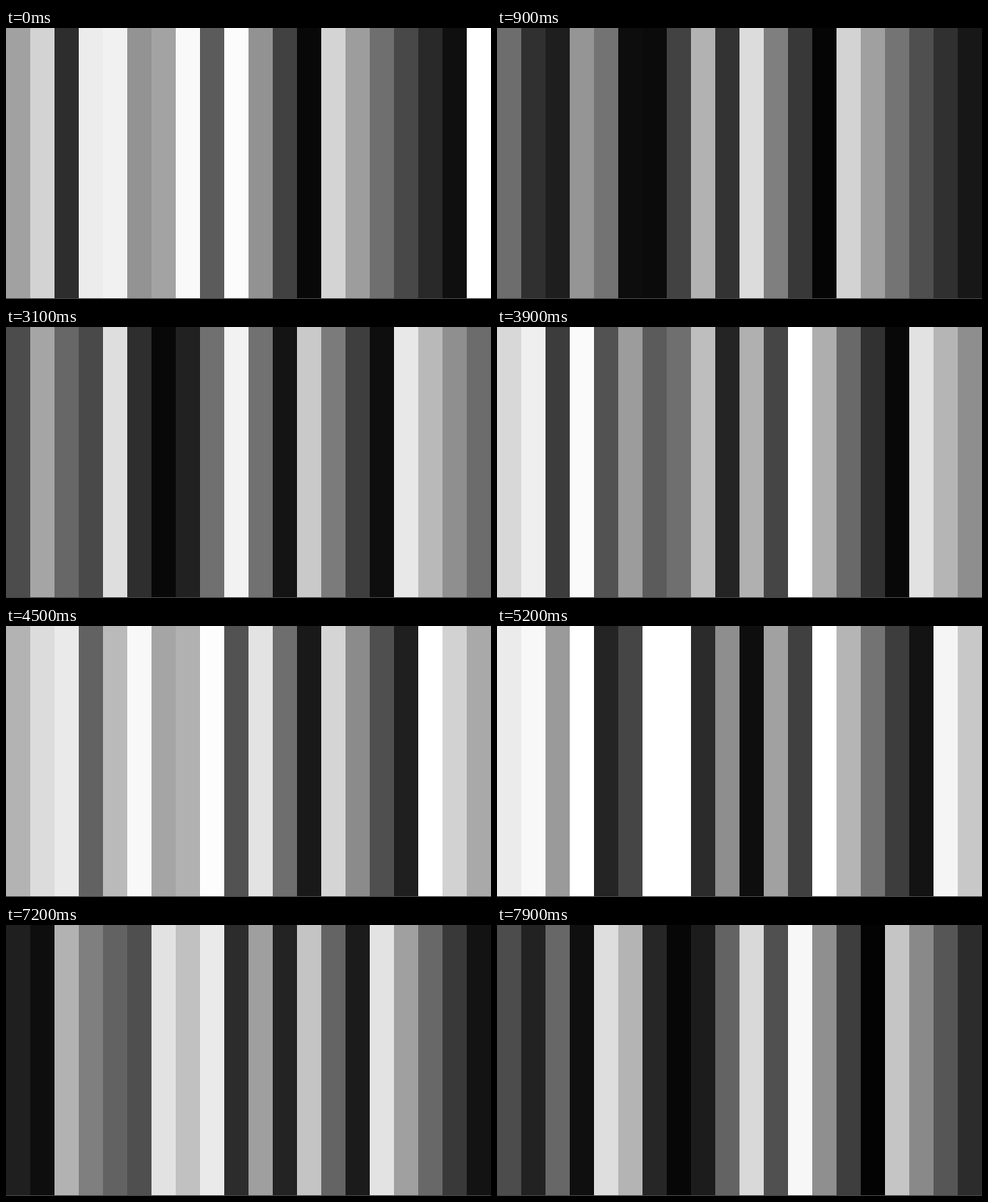
These frames come from a looping animation (600 px wide and 336 px high, 8 s). An HTML page with a canvas:

```html
<!DOCTYPE html>
<html lang="en">
<head>
<meta charset="utf-8">
<title>Harmonic bars</title>
<style>
  html, body { margin: 0; width: 100%; height: 100%; overflow: hidden; background: #000; }
  canvas { display: block; width: 600px; height: 336px; }
</style>
</head>
<body>
<canvas id="stage" width="600" height="336"></canvas>
<script>
const ctx = document.getElementById('stage').getContext('2d');
const BARS = 20, BAR_W = 30, W = 600, H = 336;
const STEP_MS = 100, LOOP_MS = 8000;
const START = 39.66;        // cycles done by the first bar when the loop begins
const PER_STEP = 0.3125;    // cycles added to the first bar at each step

// Sawtooth phase 0..1 to a slightly darkened grey level.
const tone = phase => Math.min(255, Math.round(262 * Math.pow(phase, 1.17)));

function draw(step) {
  const cycles = START + PER_STEP * step;
  for (let i = 0; i < BARS; i++) {
    // Bar n runs at 1/n of the first bar's speed.
    const g = tone((cycles / (i + 1)) % 1);
    ctx.fillStyle = `rgb(${g},${g},${g})`;
    ctx.fillRect(i * BAR_W, 0, BAR_W, H);
  }
  ctx.fillStyle = '#444';
  ctx.fillRect(0, H - 1, W, 1);
}

const t0 = performance.now();
function tick() {
  const t = Math.max(0, performance.now() - t0) % LOOP_MS;
  draw(Math.floor(t / STEP_MS));
  requestAnimationFrame(tick);
}
tick();
</script>
</body>
</html>
```
